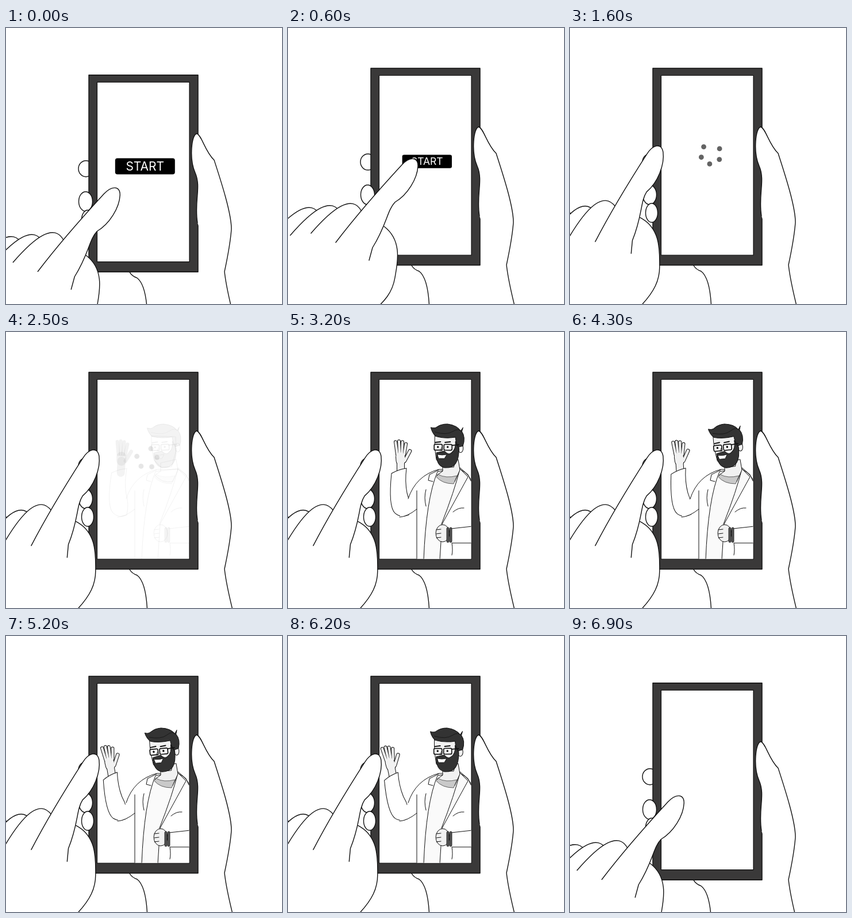
An HTML page with a canvas that plays this animation: 480x480 px, repeating every 7 s.

```html
<!DOCTYPE html>
<html lang="en">
<head>
<meta charset="utf-8">
<title>Video call</title>
<style>
  html, body { margin: 0; width: 100%; height: 100%; overflow: hidden; background: #fff; }
  canvas { display: block; width: 480px; height: 480px; }
</style>
</head>
<body>
<canvas id="stage" width="480" height="480"></canvas>
<script>
const ctx = document.getElementById('stage').getContext('2d');
const LOOP = 7000, STEP = 100, WAVE = 800, TAU = 2 * Math.PI, DEG = Math.PI / 180;
const INK = '#111', DARK = '#3a3939', HAIR = '#333', SKIN = '#f1f1f1', SHIRT = '#fafafa';
const BOLD = 1.4;

const mix = (a, b, k) => a + (b - a) * k;
function ease(t, from, to) {
  const k = Math.max(0, Math.min(1, (t - from) / (to - from)));
  return k * k * (3 - 2 * k);
}

function draw(path, fill, width = 1) {
  if (fill) { ctx.fillStyle = fill; ctx.fill(path); }
  if (width) { ctx.lineWidth = width; ctx.strokeStyle = INK; ctx.stroke(path); }
}
const shape = (d, fill, width) => draw(new Path2D(d), fill, width);

function oval(x, y, rx, ry, fill, width) {
  const path = new Path2D();
  path.ellipse(x, y, rx, ry, 0, 0, TAU);
  draw(path, fill, width);
}

function box(x, y, w, h, fill, width, radius = 0) {
  const path = new Path2D();
  path.roundRect(x, y, w, h, radius);
  draw(path, fill, width);
}

function limb(x1, y1, x2, y2, width, color) {
  ctx.lineWidth = width;
  ctx.strokeStyle = color;
  ctx.beginPath();
  ctx.moveTo(x1, y1);
  ctx.lineTo(x2, y2);
  ctx.stroke();
}

function placed(x, y, angle, paint, pivotX = x, pivotY = y) {
  ctx.save();
  ctx.translate(x, y);
  ctx.rotate(angle * DEG);
  ctx.translate(-pivotX, -pivotY);
  paint();
  ctx.restore();
}

function drawPhone() {
  shape('M215 413Q219 420 228 423Q245 436 246 495', null, BOLD);
  oval(139, 233, 13, 14, '#fff', BOLD);
  box(144, 70, 190, 342.5, DARK, BOLD);
  box(158.5, 82.5, 160.5, 312.5, '#fff', 1.2);
}

function drawHolder() {
  oval(138.5, 290, 12, 17, '#fff', BOLD);
  oval(142, 321.5, 10.5, 16.5, '#fff', BOLD);
  shape('M333 327C327 290 340 265 329 240C318 215 323 172 332 172C341 176 346 203 362 218' +
    'C374 255 392 310 392 338Q390 365 380 412Q383 440 397 495', '#fff', BOLD);
}

function drawTapper() {
  const palm = 'M167 345C200 370 190 410 186 434S170 476 140 498';
  shape(palm + 'L-60 620V400L83 373Z', '#fff', 0);
  shape(palm, null, BOLD);
  for (const i of [2, 1, 0]) {
    placed(-36 * i, 3.5 * i, 0, () => shape('M40 357C78 313 112 288 128 319', '#fff', BOLD), 0, 0);
  }
  shape('M83 373Q128 314 198 238C210 225 226 222 226 240C225 262 208 290 186 303' +
    'C172 318 172 342 147 382L141 404', '#fff', BOLD);
}

function drawButton(scale, shift) {
  ctx.save();
  ctx.translate(241.8, 228.8 + shift + 20 * (1 - scale));
  ctx.scale(scale, scale);
  box(-52, -14, 104, 28, '#000', 0, 4);
  ctx.fillStyle = '#fff';
  ctx.font = '400 21px Inter, sans-serif';
  ctx.textAlign = 'center';
  ctx.fillText('START', 0, 7.5);
  ctx.restore();
}

function drawLoader(t) {
  const spin = (t - 1600) * 0.36;
  for (let i = 0; i < 5; i++) {
    const a = (329 + spin + 64 * i) * DEG;
    oval(245 + 17.6 * Math.cos(a), 219 + 17.6 * Math.sin(a), 4.4, 4.4, '#636363', 0);
  }
}

function drawForearm() {
  // An ink pass below a slightly thinner skin pass leaves one outline around the hand.
  for (const [color, extra] of [[INK, 2], [SKIN, 0]]) {
    for (let i = 0; i < 4; i++) {
      limb(190 + 4 * i, 213, 187 + 6 * i, 190 + 1.2 * (i - 1) ** 2, 4 + extra, color);
    }
    limb(203, 224, 212, 207, 4.5 + extra, color);
    limb(195.5, 217, 196, 224, 15 + extra, color);
    limb(196, 224, 196, 245, 12 + extra, color);
  }
  shape('M180 246C177 275 176 305 186 315Q196 324 210 318Q214 300 207 280Q203 260 206 237Q192 239 180 246Z', '#fff');
}

function drawBody() {
  shape('M194 322Q208 321 224 308V396H320V262Q317 249 300 239H262Q222 250 209 290', '#fff');
  shape('M224 308V276M240 274Q236 288 240 303M287 313Q296 305 306 306');
  shape('M260 243Q240 290 236 396H264L268 334L313 252L299 238Z', SHIRT);
  shape('M299 238Q290 275 267 334M299 236L313 248L318 259M262 240L246 248L244 258L252 260');
  shape('M269 228V242L259 249Q272 264 290 260L299 240L296 222Z', SKIN);
  shape('M262 248Q274 255 294 250L288 264Q268 264 258 252Z', '#c9c9c9', 0.6);
  shape('M284 342L320 338V367H285Q287 380 285 388', '#fff');
  oval(269, 350, 12, 15, SKIN);
  for (let i = 0; i < 3; i++) limb(258, 344 + 7 * i, 266, 343 + 7 * i, 1, INK);
  for (const x of [276, 281]) box(x, 340, 4, 26, '#555', 0.8, 2);
}

function drawHead() {
  oval(300, 202, 4.5, 7.5, SKIN);
  shape('M255 180Q254 200 258 222L270 235H288L297 207V183Z', SKIN);
  shape('M291 190L297 203Q298 238 272 236Q257 232 258 210L272 207Q279 215 284 210Q292 205 291 190Z', HAIR);
  shape('M260 213Q268 215 276 213L272 220H262Z', '#fff', 0.8);
  shape('M248 166C262 170 256 160 277 160Q293 162 300 172L304 166L302 173Q309 183 304 198L296 200' +
    'Q291 190 291 183Q272 186 256 181Q250 175 248 166Z', HAIR);
  shape('M255 174Q275 180 286 173T301 173', null, 0.7);
  for (const x of [254, 271]) {
    box(x, 195.5, 14, 10, '#fff', 1.7, 2);
    oval(x + 6.5, 200, 1.8, 1.8, INK, 0);
    limb(x + 2, 192, x + 11, 191, 2, INK);
  }
  limb(285, 197, 297, 196, 1.7, INK);
  shape('M267 201L264 206H268', null, 0.8);
}

function drawCaller(t) {
  const phase = ((t - 3200) / WAVE * 360 - 53) * DEG;
  placed(200, 312, 8 * Math.cos(phase) - 4.8, drawForearm);
  drawBody();
  placed(274, 240, -3.5 * Math.sin(phase) - 2.5, drawHead);
}

function tapperPose(t) {
  const rest = [189.3, 277.5, 0], tap = [217, 227, 0], side = [150.8, 204.7, -9.9];
  const blend = (a, b, k) => a.map((v, i) => mix(v, b[i], k));
  if (t < 900) return blend(rest, tap, ease(t, 0, 550));
  if (t < 6200) return blend(tap, side, ease(t, 900, 1500));
  return blend(side, rest, ease(t, 6250, 6800));
}

function render(t) {
  const shift = 11.7 * (1 - ease(t, 0, 500) + ease(t, 6400, 6800));
  const press = ease(t, 450, 600) - ease(t, 650, 800);
  const loader = ease(t, 950, 1150) - ease(t, 2350, 2550);
  const caller = ease(t, 2450, 2800) - ease(t, 6250, 6600);

  ctx.fillStyle = '#fff';
  ctx.fillRect(0, 0, 480, 480);
  ctx.lineJoin = ctx.lineCap = 'round';

  const onPhone = paint => placed(0, shift, 0, paint, 0, 0);
  onPhone(() => {
    drawPhone();
    ctx.beginPath();
    ctx.rect(159, 83, 159.5, 311.5);
    ctx.clip();
    ctx.globalAlpha = loader;
    if (loader) drawLoader(t);
    ctx.globalAlpha = caller;
    if (caller) drawCaller(t);
  });
  if (t < 1000) drawButton(1 - 0.17 * press, shift);
  onPhone(drawHolder);
  placed(...tapperPose(t), drawTapper, 217, 227);
}

const start = performance.now();
function tick() {
  const t = (performance.now() - start) % LOOP;
  render(Math.floor(t / STEP) * STEP);
  requestAnimationFrame(tick);
}
tick();
</script>
</body>
</html>
```
